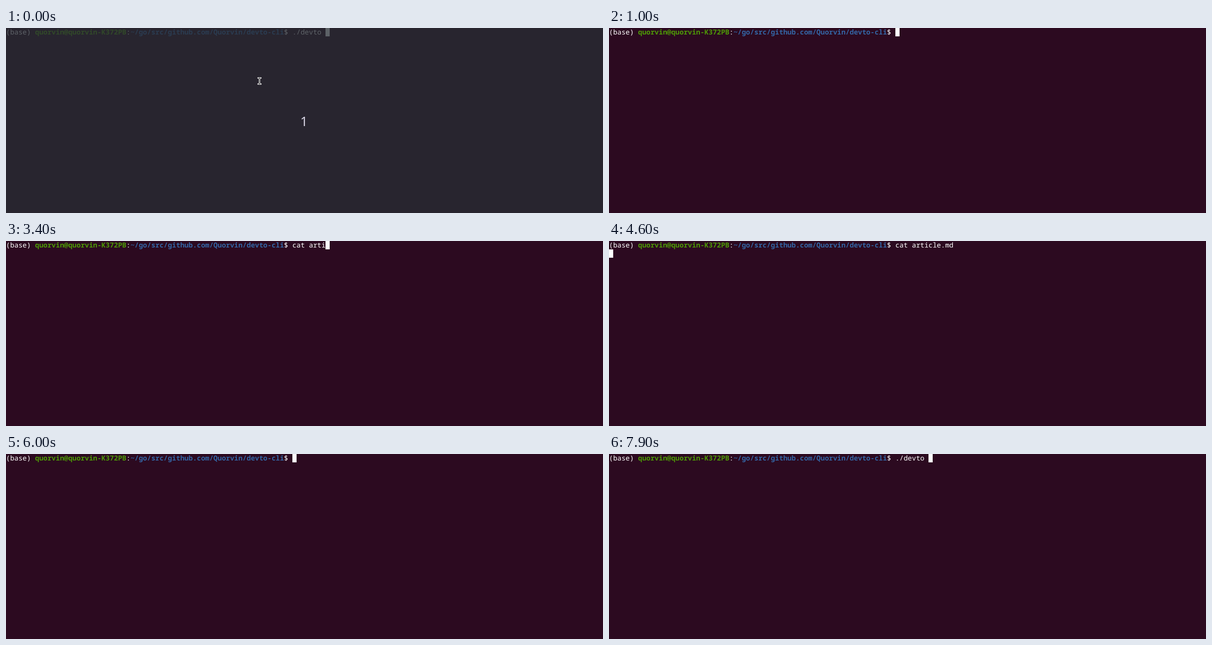
An HTML page for the animation above (8 s loop, 1280x398 px).

```html
<!DOCTYPE html>
<html lang="en">
<head>
<meta charset="utf-8">
<title>Terminal session</title>
<style>
  html, body { margin: 0; width: 100%; height: 100%; overflow: hidden; background: #2c0a20; }
  #stage { position: relative; width: 1280px; height: 398px; overflow: hidden; }
  pre {
    position: absolute; left: 0; top: 1px; margin: 0; color: #fff;
    font: 14.833px/17.8px "Noto Sans Mono", monospace;
    text-rendering: geometricPrecision;
  }
  b { color: #4e9a06; }
  b + b { color: #3465a4; }
  #cursor { position: absolute; width: 9px; height: 18px; background: #fff; }
  #countdown { position: absolute; inset: 0; background: rgba(39, 46, 52, .75); }
  #countdown span {
    position: absolute; left: 0; top: 180px; width: 1278px; text-align: center;
    font: 28px/40px "Noto Sans", sans-serif; color: #d6d3e2;
  }
  svg { position: absolute; left: 538px; top: 104px; }
</style>
</head>
<body>
<div id="stage">
  <pre id="screen"></pre>
  <div id="cursor"></div>
  <div id="countdown">
    <span>1</span>
    <svg width="12" height="20" fill="none">
      <path d="M3 3.5h5M3 16.5h5M5.5 3.5v13" stroke="#fff" stroke-width="3" stroke-linecap="square"/>
      <path d="M3 3.5h5M3 16.5h5M5.5 3.5v13" stroke="#111"/>
    </svg>
  </div>
</div>
<script>
const LOOP = 8000, CELL = 8.9, ROW = 17.8;
const prompt = '(base) <b>quorvin@quorvin-K372PB</b>:<b>~/go/src/github.com/Quorvin/devto-cli</b>$ ';
const promptWidth = prompt.replace(/<.*?>/g, '').length;
const article = ['---', 'title: My first article', 'published: false', 'tags: go, cli', '---', 'Hello from the terminal'];
const run = './devto ', cat = 'cat article.md ';

// Each step: start time, typed text, cursor visible, listing state
const steps = [];
const step = (time, text, cursor = true, listing = '') => steps.push({ time, text, cursor, listing });
const type = (text, times) => times.forEach((time, i) => step(time, text.slice(0, i + 1)));

step(0, run);
step(500, run.slice(0, 7));
step(600, run.slice(0, 4));
step(700, run.slice(0, 1));
step(1000, '');
step(2200, '', false);
type(cat, [2300, 2500, 2600, 2800, 3000, 3100, 3300, 3400, 3600, 3700, 4000]);
step(4400, cat);
step(4600, cat, true, 'waiting');
step(5000, cat, false, 'done');
step(5400, cat, true, 'done');
step(6000, '');
step(6300, '', false);
type(run, [6400, 6500, 6700, 6900, 7000, 7300, 7500, 7900]);

const [screenEl, cursorEl, countdownEl] =
  ['screen', 'cursor', 'countdown'].map(id => document.getElementById(id));
let shown;

function render({ time, text, cursor, listing }) {
  const lines = [prompt + text];
  let row = 0, col = promptWidth + text.length;
  if (listing === 'waiting') [row, col] = [1, 0];
  if (listing === 'done') {
    lines.push(...article, prompt);
    [row, col] = [lines.length - 1, promptWidth];
  }
  screenEl.innerHTML = lines.join('\n');
  cursorEl.hidden = !cursor;
  cursorEl.style.left = Math.round(col * CELL) + 'px';
  cursorEl.style.top = Math.round(row * ROW) + 'px';
  countdownEl.hidden = time > 0;
}

const origin = performance.now();
function frame() {
  const time = Math.max(0, performance.now() - origin) % LOOP;
  const current = steps.findLast(s => s.time <= time);
  if (current !== shown) render(shown = current);
  requestAnimationFrame(frame);
}
frame();
</script>
</body>
</html>
```
